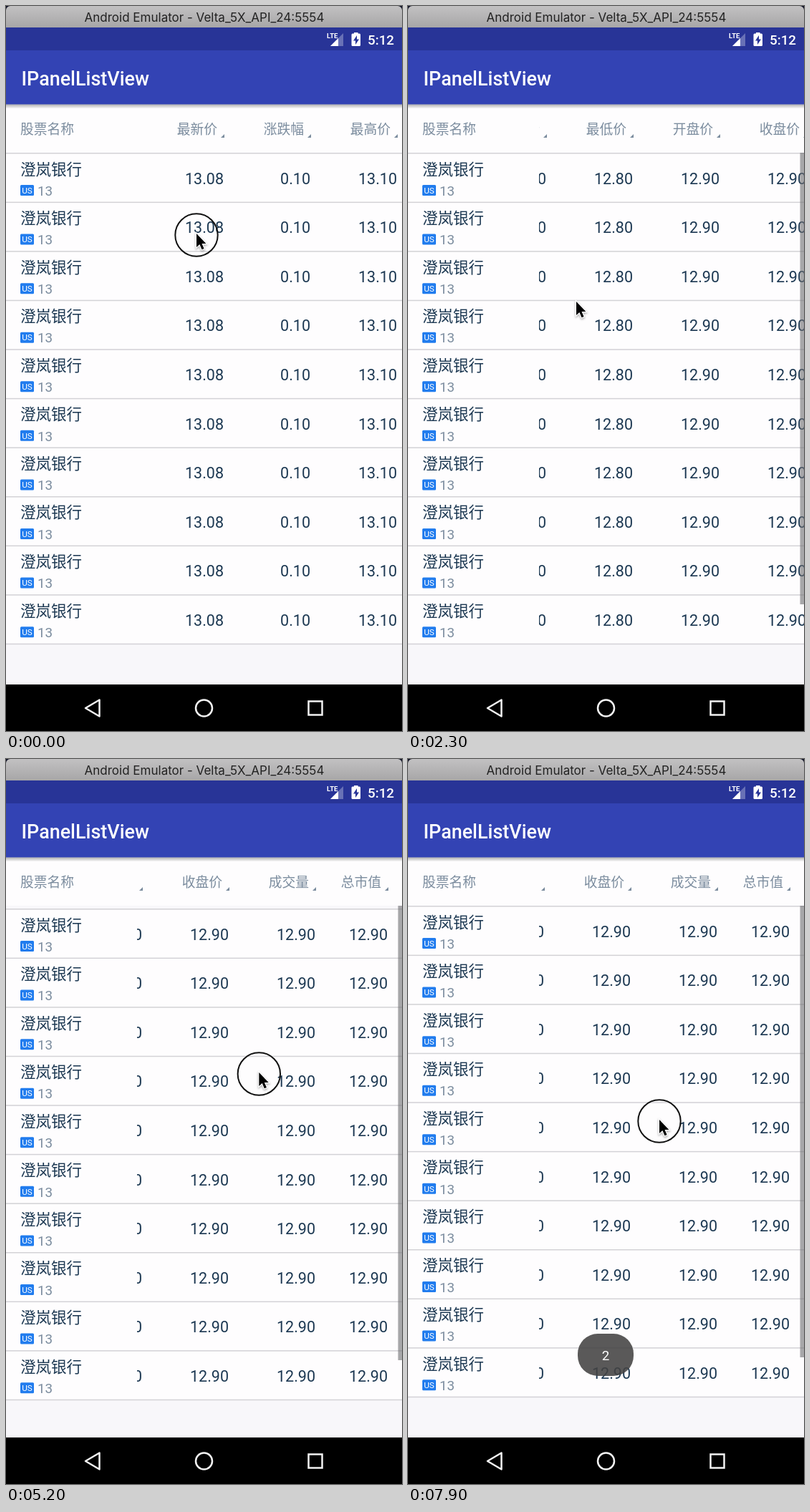
Animation of 553 by 1013 pixels, one loop 8 s. Source, as an HTML page with a canvas:

```html
<!DOCTYPE html>
<html lang="zh-CN">
<head>
<meta charset="utf-8">
<title>IPanelListView</title>
<style>
  html, body { margin: 0; width: 100%; height: 100%; overflow: hidden; background: #000; }
  canvas { display: block; }
</style>
</head>
<body>
<canvas id="stage" width="553" height="1013"></canvas>
<script>
const ctx = document.getElementById('stage').getContext('2d');
const W = 553, LOOP = 8000, STEP = 100;
const SANS = 'Roboto, "Noto Sans CJK SC", "Noto Sans CJK", sans-serif';
const INK = '#1c3852', GRAY = '#7b8c9e', PAGE = '#f8f7fa', PAPER = '#fefdfe';
const LIST_TOP = 205.5, LIST_END = 948, ROW = 68.57, ROWS = 10, PANEL_X = 183;

// Header, cell value and right edge of each scrolling column.
const columns = [
  ['最新价', '13.08', 304], ['涨跌幅', '0.10', 425], ['最高价', '13.10', 546],
  ['最低价', '12.80', 667], ['开盘价', '12.90', 788], ['收盘价', '12.90', 909],
  ['成交量', '12.90', 1030], ['总市值', '12.90', 1131]
];

const linear = p => p;
const glide = p => p * p * (3 - 2 * p);
const fling = p => 1 - (1 - p) ** 3;

// Keys are [time, value, easing towards this value].
const scrollKeys = [[0, 0], [100, 0], [700, 106, glide], [1200, 159, fling], [1800, 159],
  [2300, 353, p => p * p], [3100, 531, fling], [3700, 531], [4200, 598, glide]];
const pullKeys = [[0, 0], [5100, 0], [5200, 4], [5700, 172, glide], [5800, 166],
  [6100, 81, fling], [6900, 81], [7200, 0, fling]];
const cursorX = [[0, 266], [100, 266], [700, 160, glide], [1000, 160], [1500, 191, glide],
  [1800, 400, glide], [2300, 235, p => p * p], [2500, 235], [3400, 479, glide],
  [3700, 479], [4200, 380, glide], [4800, 355, glide], [5700, 351, glide]];
const cursorY = [[0, 318], [100, 318], [700, 345, glide], [1500, 374, glide],
  [1800, 405, glide], [2300, 413, glide], [3500, 411], [4200, 418], [4800, 436, glide],
  [5100, 436], [5200, 438], [5700, 504, glide]];
const presses = [[0, 700], [1800, 2250], [3700, 4200], [5000, 5750], [7800, 8000]];

function valueAt(keys, t) {
  const next = keys.findIndex(key => key[0] > t);
  if (next < 0) return keys[keys.length - 1][1];
  const [t0, v0] = keys[next - 1], [t1, v1, ease = linear] = keys[next];
  return v0 + (v1 - v0) * ease((t - t0) / (t1 - t0));
}

function text(str, x, y, size, color, align = 'left', weight = 400, family = SANS) {
  ctx.font = `${weight} ${size}px ${family}`;
  ctx.fillStyle = color;
  ctx.textAlign = align;
  ctx.fillText(str, x, y);
}

function rect(x, y, w, h, color) {
  ctx.fillStyle = color;
  ctx.fillRect(x, y, w, h);
}

function roundRect(x, y, w, h, r, color) {
  ctx.beginPath();
  ctx.roundRect(x, y, w, h, r);
  ctx.fillStyle = color;
  ctx.fill();
}

function path(points) {
  ctx.beginPath();
  points.forEach(([x, y]) => ctx.lineTo(x, y));
  ctx.closePath();
}

function polygon(points, color) {
  path(points);
  ctx.fillStyle = color;
  ctx.fill();
}

function ring(x, y, r, color, width, from = 0, to = 2 * Math.PI) {
  ctx.beginPath();
  ctx.arc(x, y, r, from, to);
  ctx.strokeStyle = color;
  ctx.lineWidth = width;
  ctx.stroke();
}

function clipped(x, y, w, h, draw) {
  ctx.save();
  ctx.beginPath();
  ctx.rect(x, y, w, h);
  ctx.clip();
  draw();
  ctx.restore();
}

function verticalFade(y, h, from, to) {
  const fade = ctx.createLinearGradient(0, y, 0, y + h);
  fade.addColorStop(0, from);
  fade.addColorStop(1, to);
  return fade;
}

function drawWindowBar() {
  rect(0, 0, W, 30, '#101326');
  roundRect(0, 0, W, 30, [6, 6, 0, 0], verticalFade(0, 30, '#c2c1c2', '#a7a6a7'));
  text('Android Emulator - Velta_5X_API_24:5554', 277, 22, 17, '#222', 'center', 400, 'Inter, sans-serif');
}

function drawAppBar() {
  rect(0, 30, W, 32, '#283497');
  rect(0, 62, W, 75.5, '#3343b4');
  rect(0, 137.5, W, 6, verticalFade(137.5, 6, 'rgba(0,0,0,.3)', 'rgba(0,0,0,0)'));
  text('IPanelListView', 21.5, 110.5, 26.9, '#fff', 'left', 500);

  text('LTE', 448, 45, 9.5, '#fff', 'left', 700);
  polygon([[471, 38], [471, 56], [453, 56]], 'rgba(255,255,255,.3)');
  polygon([[464, 45], [464, 56], [453, 56]], '#fff');
  roundRect(482.5, 38.5, 12.5, 17.5, 1.5, '#fff');
  rect(486, 37, 5.5, 2, '#fff');
  polygon([[490, 41], [485, 48.5], [488, 48.5], [488, 54], [493, 46.5], [490, 46.5]], '#283497');
  text('5:12', 505, 53.7, 18.8, '#fff', 'left', 500);
}

function drawColumnHeads(scroll) {
  text('股票名称', 20, 179, 18.8, GRAY);
  clipped(PANEL_X, 140, W, 65, () => {
    for (const [head, , right] of columns) {
      const x = right - scroll;
      text(head, x - 9, 179, 18.8, GRAY, 'right');
      polygon([[x + 1, 179], [x + 1, 184], [x - 4, 184]], GRAY);
    }
  });
}

function drawRefreshHead(bottom, pull, t) {
  const refreshing = t > 5800, ready = pull > 81;
  const label = refreshing ? '正在刷新...' : ready ? '松开刷新' : '下拉刷新';
  text(label, 223, bottom - 47.3, 18.8, '#858487');
  text('最后更新时间 :', 223, bottom - 19.5, 13.4, '#858487');

  ctx.save();
  ctx.translate(193, bottom - 40);
  if (refreshing) {
    const start = t / 1000 * 2 * Math.PI;
    ring(0, 0, 12, '#74828f', 3, start, start + 4.5);
  } else {
    if (!ready) ctx.rotate(Math.PI);
    polygon([[0, -14.5], [9.5, -3], [-9.5, -3]], '#74828f');
    rect(-5, -3, 10, 6, '#74828f');
    for (const y of [4.5, 8.5, 12.5]) rect(-5, y, 10, 2.3, '#74828f');
  }
  ctx.restore();
}

function drawRow(y, scroll) {
  text('澄岚银行', 20, y + 30, 21.5, INK);
  roundRect(20, y + 44.5, 19, 15, 1.5, '#217cee');
  text('US', 29.5, y + 56.2, 11.8, '#fff', 'center');
  text('13', 44, y + 59.2, 18.8, GRAY);
  clipped(PANEL_X, y, W, ROW, () => {
    for (const [, value, right] of columns) text(value, right - scroll, y + 43.2, 21.5, INK, 'right');
  });
}

function drawList(scroll, pull, t) {
  const top = LIST_TOP + pull;
  clipped(0, LIST_TOP - 1, W, LIST_END - LIST_TOP + 1, () => {
    rect(0, LIST_TOP - 1, W, 800, PAGE);
    if (pull > 0) drawRefreshHead(top, pull, t);
    rect(0, top, W, ROW * ROWS, PAPER);
    for (let i = 0; i <= ROWS; i++) {
      const y = top + i * ROW;
      if (i < ROWS) drawRow(y, scroll);
      rect(0, y - .5, W, 1.5, '#d3d2d6');
    }
    if (t >= 200) {
      const end = pull <= 4 ? 836 + pull : 840 - (pull - 4) * 51 / 162;
      rect(547.5, 205, 5.5, end - 205, 'rgba(110,110,114,.6)');
    }
  });
}

function drawNavBar() {
  rect(0, LIST_END, W, 65, '#000');
  ctx.strokeStyle = '#f2f2f2';
  ctx.lineWidth = 2.5;
  ctx.lineJoin = 'round';
  path([[111, 981], [130.5, 969.5], [130.5, 992.5]]);
  ctx.stroke();
  ctx.lineJoin = 'miter';
  ctx.strokeRect(422.5, 971.5, 19, 19);
  ring(276.5, 981, 11.5, '#f2f2f2', 2.5);
}

function drawToast(t) {
  ctx.globalAlpha = Math.min(1, Math.max(0, (t - 7200) / 300));
  roundRect(237, 803, 78, 59, 28, 'rgba(68,66,66,.88)');
  text('2', 276, 840, 18.8, '#fff', 'center');
  ctx.globalAlpha = 1;
}

function drawCursor(x, y, pressed) {
  if (pressed) ring(x, y + 2, 29.7, '#111', 2);
  ctx.save();
  ctx.translate(x, y);
  path([[0, 0], [0, 19], [4.4, 15], [7.5, 22.3], [10.6, 21], [7.5, 14], [13.4, 14]]);
  ctx.shadowColor = 'rgba(0,0,0,.35)';
  ctx.shadowBlur = 3;
  ctx.shadowOffsetY = 1.5;
  ctx.strokeStyle = '#fff';
  ctx.lineWidth = 2.4;
  ctx.stroke();
  ctx.shadowColor = 'transparent';
  ctx.fillStyle = '#000';
  ctx.fill();
  ctx.restore();
}

function draw(now) {
  const t = Math.floor(now % LOOP / STEP) * STEP;
  const scroll = valueAt(scrollKeys, t), pull = valueAt(pullKeys, t);
  const pressed = presses.some(([from, to]) => t >= from && t < to);
  rect(0, 0, W, 1013, PAPER);
  drawList(scroll, pull, t);
  drawColumnHeads(scroll);
  drawWindowBar();
  drawAppBar();
  drawNavBar();
  drawToast(t);
  drawCursor(valueAt(cursorX, t), valueAt(cursorY, t), pressed);
}

const start = performance.now();
function tick() {
  draw(performance.now() - start);
  requestAnimationFrame(tick);
}
tick();
</script>
</body>
</html>
```
